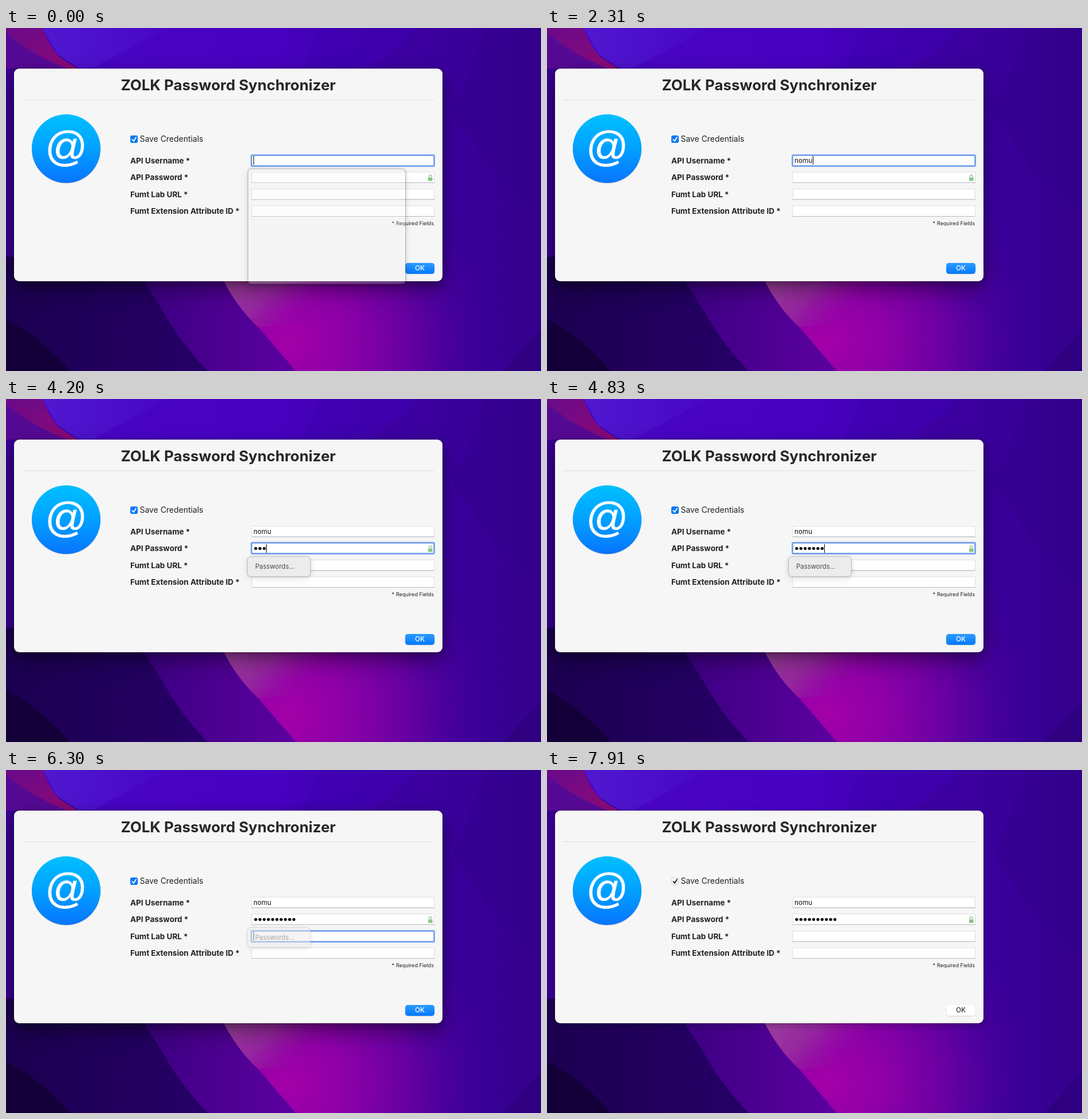
These frames come from a looping animation (934x600 px, 8 s). An HTML page:

```html
<!DOCTYPE html>
<html lang="en">
<head>
<meta charset="utf-8">
<title>Password dialog</title>
<style>
html, body { margin: 0; width: 100%; height: 100%; overflow: hidden; background: #3b0094; }
.stage { position: absolute; left: 0; top: 0; width: 934px; height: 600px; overflow: hidden;
  font-family: Inter, Roboto, sans-serif; }
.stage > * { position: absolute; box-sizing: border-box; }
svg { left: 0; top: 0; }
.label { font-weight: 700; font-size: 13.5px; }

.step { animation: 8s step-end infinite; }
.fade { animation: 8s linear infinite; }

.window { left: 14px; top: 71px; width: 748px; height: 372px; border-radius: 9px; background: #f6f6f6;
  box-shadow: 0 0 0 .5px rgba(0,0,0,.4), 0 4px 14px rgba(0,0,0,.25); }
.shadow { left: 14px; top: 71px; width: 748px; height: 372px; border-radius: 9px;
  box-shadow: 0 16px 36px rgba(0,0,0,.36); }

.active { animation-name: active; }
@keyframes active { 0%, 97.4% { opacity: 1 } 98.6%, 100% { opacity: 0 } }

/* Text fields: ring, typed part, caret */
.ring { left: 427px; width: 322px; height: 22px; border: 3px solid #7ca6ec; border-radius: 3px; }
.typed { left: 432px; height: 15px; }
.typed i { position: absolute; inset: 0; overflow: hidden; font: 11.7px/16px Inter, Roboto, sans-serif; color: #111; }
.typed b { position: absolute; left: 100%; top: 0; width: 1px; height: 15px; background: #000; }
.r1 { top: 221px; } .r2 { top: 250px; } .r3 { top: 280px; }
.t1 { top: 224px; } .t2 { top: 253.5px; } .t3 { top: 283px; width: 0; }
.t2 i { background: radial-gradient(circle at 3.9px 7.5px, #111 2.3px, transparent 3px) 0 0 / 7.42px 15px; }

.r1 { animation-name: ring1; } .r2 { animation-name: ring2; } .r3 { animation-name: ring3; }
@keyframes ring1 { 0% { opacity: 1 } 32.375%, 100% { opacity: 0 } }
@keyframes ring2 { 0% { opacity: 0 } 32.375% { opacity: 1 } 77%, 100% { opacity: 0 } }
@keyframes ring3 { 0% { opacity: 0 } 77% { opacity: 1 } 98%, 100% { opacity: 0 } }

.t1 { animation-name: type1; } .t2 { animation-name: type2; }
@keyframes type1 {
  0% { width: 0 } 20.125% { width: 7px } 22.75% { width: 14px }
  27.125% { width: 24.5px } 28.875%, 100% { width: 31.5px }
}
@keyframes type2 {
  0% { width: 0 } 47.25% { width: 7.42px } 49.875% { width: 14.84px } 52.5% { width: 22.26px }
  55.125% { width: 29.68px } 56.875% { width: 37.1px } 58.625% { width: 44.52px }
  60.375% { width: 51.94px } 62.125% { width: 59.36px } 71.75% { width: 66.78px }
  74.375%, 100% { width: 74.2px }
}

.t1 b { animation-name: caret1; } .t2 b { animation-name: caret2; } .t3 b { animation-name: caret3; }
@keyframes caret1 {
  0% { opacity: 1 } 4.375% { opacity: .4 } 5.25% { opacity: 0 } 9.625% { opacity: .4 }
  10.5% { opacity: 1 } 17.5% { opacity: 0 } 20.125% { opacity: 1 } 32.375%, 100% { opacity: 0 }
}
@keyframes caret2 {
  0% { opacity: 0 } 32.375% { opacity: 1 } 38.5% { opacity: .4 } 39.375% { opacity: 0 }
  45.5% { opacity: 1 } 66.5% { opacity: .4 } 67.375% { opacity: 0 } 71.75% { opacity: 1 }
  77%, 100% { opacity: 0 }
}
@keyframes caret3 {
  0% { opacity: 0 } 77% { opacity: 1 } 84% { opacity: .4 } 84.875% { opacity: 0 }
  90.125% { opacity: .4 } 91% { opacity: 1 } 97.125%, 100% { opacity: 0 }
}

/* Suggestion popups */
.list { left: 422px; top: 246px; width: 276px; height: 202px; border-radius: 6px;
  border: 1px solid rgba(0,0,0,.26); background: rgba(243,243,243,.25);
  box-shadow: 0 1px 5px rgba(0,0,0,.18), 0 5px 16px rgba(0,0,0,.08); animation-name: list; }
@keyframes list { 0%, 21% { opacity: 1 } 24.5%, 100% { opacity: 0 } }
.hint { left: 421px; top: 274.5px; width: 111px; height: 36.5px; border-radius: 7px; padding-left: 13px;
  border: 1px solid #bcbcbc; background: #ececec; color: #4b4b4b; font-size: 11.4px; line-height: 34px;
  box-shadow: 0 1px 5px rgba(0,0,0,.12), 0 4px 14px rgba(0,0,0,.08); animation-name: hint; }
@keyframes hint {
  0%, 32.3% { opacity: 0 } 33.25%, 77% { opacity: 1 } 80.5%, 100% { opacity: 0 }
}
</style>
</head>
<body>
<div class="stage">
  <svg width="934" height="600">
    <defs>
      <linearGradient id="sky" x1="0" x2="1">
        <stop offset="0" stop-color="#4a08c4"/><stop offset=".5" stop-color="#4700c0"/>
        <stop offset=".72" stop-color="#4000a8"/><stop offset="1" stop-color="#34008c"/>
      </linearGradient>
      <linearGradient id="band" x1="0" x2="1">
        <stop offset="0" stop-color="#5018d0"/><stop offset="1" stop-color="#4806c4"/>
      </linearGradient>
      <radialGradient id="glow" gradientUnits="userSpaceOnUse" cx="490" cy="550" r="370">
        <stop offset="0" stop-color="#a400a8"/><stop offset=".25" stop-color="#9000a8"/>
        <stop offset=".58" stop-color="#6600a2"/><stop offset="1" stop-color="#3b0092" stop-opacity="0"/>
      </radialGradient>
      <linearGradient id="pink" x1="0" y1="0" x2="1" y2=".45">
        <stop offset="0" stop-color="#a04a9c"/><stop offset=".5" stop-color="#96309c" stop-opacity=".8"/>
        <stop offset="1" stop-color="#8c00a8" stop-opacity="0"/>
      </linearGradient>
      <linearGradient id="mid" x1="0" x2="1">
        <stop offset="0" stop-color="#3a0080"/><stop offset="1" stop-color="#5c00a0"/>
      </linearGradient>
      <linearGradient id="navy" x1="0" x2="1">
        <stop offset="0" stop-color="#1c0050"/><stop offset="1" stop-color="#260068"/>
      </linearGradient>
      <linearGradient id="rose" x1="0" x2="1" y2="1">
        <stop offset="0" stop-color="#6a0a8a"/><stop offset="1" stop-color="#8c0a74"/>
      </linearGradient>
    </defs>
    <path fill="url(#sky)" d="M0 0H934V600H0Z"/>
    <path fill="url(#band)" d="M64 0H280L150 71H130L94 52Z"/>
    <path fill="#3d00b0" d="M548 0H722L690 30L600 71H518Z" opacity=".5"/>
    <path fill="#3a009c" d="M722 0H870L815 110L780 150L762 71H640Z" opacity=".5"/>
    <path fill="#30008a" d="M838 0H934V330L850 250L780 150Z" opacity=".4"/>
    <path fill="url(#glow)" d="M380 180H934V600H380Z"/>
    <path fill="#2b007a" d="M934 528L868 600H934Z" opacity=".7"/>
    <path fill="#390092" d="M0 0H20L130 73V443H0Z"/>
    <path fill="#560a94" d="M0 0H20L110 71H0Z"/>
    <path fill="url(#rose)" d="M0 0H64Q76 34 94 51L126 72H110Q50 50 0 8Z"/>
    <path fill="url(#mid)" d="M225 430H374Q400 486 440 523Q472 560 506 600H340Z"/>
    <path fill="url(#pink)" d="M374 430H570Q560 490 520 518L440 523Q400 486 374 430Z"/>
    <path fill="url(#navy)" d="M0 400H210Q250 455 278 502Q306 552 352 600H0Z"/>
    <path fill="#130038" d="M0 510Q60 540 112 600H0Z"/>
  </svg>

  <div class="shadow fade active"></div>
  <div class="window"></div>

  <svg width="934" height="600">
    <defs>
      <linearGradient id="disc" x2="0" y2="1">
        <stop offset="0" stop-color="#00c0ff"/><stop offset=".45" stop-color="#00a4ff"/>
        <stop offset="1" stop-color="#0874ff"/>
      </linearGradient>
      <linearGradient id="blue" x2="0" y2="1">
        <stop offset="0" stop-color="#2b9bff"/><stop offset="1" stop-color="#0579fb"/>
      </linearGradient>
      <g id="field">
        <path fill="#fff" stroke="#dedede" d="M429 .5H747.5V19H429Z"/>
        <path stroke="#b9b9b9" d="M428.5 19H748"/>
      </g>
      <path id="tick" fill="none" stroke-width="1.8" stroke-linecap="round" stroke-linejoin="round" d="M220.3 195L222.8 198L227 191.3"/>
    </defs>
    <text x="388" y="109" text-anchor="middle" font-size="25.9" font-weight="700" fill="#272727">ZOLK Password Synchronizer</text>
    <path stroke="#dfdfdf" d="M28 125.5H748"/>

    <circle cx="105" cy="212" r="60" fill="#000" opacity=".18"/>
    <circle cx="105" cy="211" r="60" fill="url(#disc)"/>
    <text x="104" y="231.5" text-anchor="middle" font-family="Liberation Sans, sans-serif" font-style="italic" font-size="73" fill="#fff" stroke="#fff" stroke-width=".6">@</text>

    <rect x="217.5" y="188.5" width="12" height="12" rx="3" fill="#fff" stroke="#c8c8c8"/>
    <use href="#tick" stroke="#111"/>
    <g class="fade active">
      <rect x="217" y="188" width="13" height="13" rx="3" fill="#0a78f5"/>
      <use href="#tick" stroke="#fff"/>
    </g>
    <text x="233.5" y="199" font-size="13.95" fill="#222">Save Credentials</text>

    <g class="label" fill="#222">
      <text x="217" y="237">API Username *</text>
      <text x="217" y="266">API Password *</text>
      <text x="217" y="296">Fumt Lab URL *</text>
      <text x="217" y="325">Fumt Extension Attribute ID *</text>
    </g>
    <use href="#field" y="222"/>
    <use href="#field" y="251.5"/>
    <use href="#field" y="281"/>
    <use href="#field" y="310.5"/>
    <path fill="none" stroke="#91bf91" stroke-width="1.2" d="M738.5 262V259.5A2.3 2.6 0 0 1 743.1 259.5V262"/>
    <rect x="737" y="261.5" width="7.6" height="6" rx="1" fill="#85c785"/>
    <text x="747" y="344.5" text-anchor="end" font-size="9.1" fill="#222">* Required Fields</text>

    <rect x="696.5" y="411.5" width="52" height="19.5" rx="5" fill="#000" opacity=".16"/>
    <rect x="697" y="411" width="51" height="19" rx="4.5" fill="#fff"/>
    <text x="722.5" y="424.3" text-anchor="middle" font-size="11.7" fill="#111">OK</text>
    <g class="fade active">
      <rect x="697" y="411" width="51" height="19" rx="4.5" fill="url(#blue)"/>
      <text x="722.5" y="424.3" text-anchor="middle" font-size="11.7" font-weight="500" fill="#fff">OK</text>
    </g>
  </svg>

  <div class="ring step r1"></div>
  <div class="ring step r2"></div>
  <div class="ring step r3"></div>
  <div class="typed step t1"><i>nomu</i><b class="step"></b></div>
  <div class="typed step t2"><i></i><b class="step"></b></div>
  <div class="typed step t3"><b class="step"></b></div>

  <div class="list fade"></div>
  <div class="hint fade">Passwords...</div>
</div>
</body>
</html>
```
